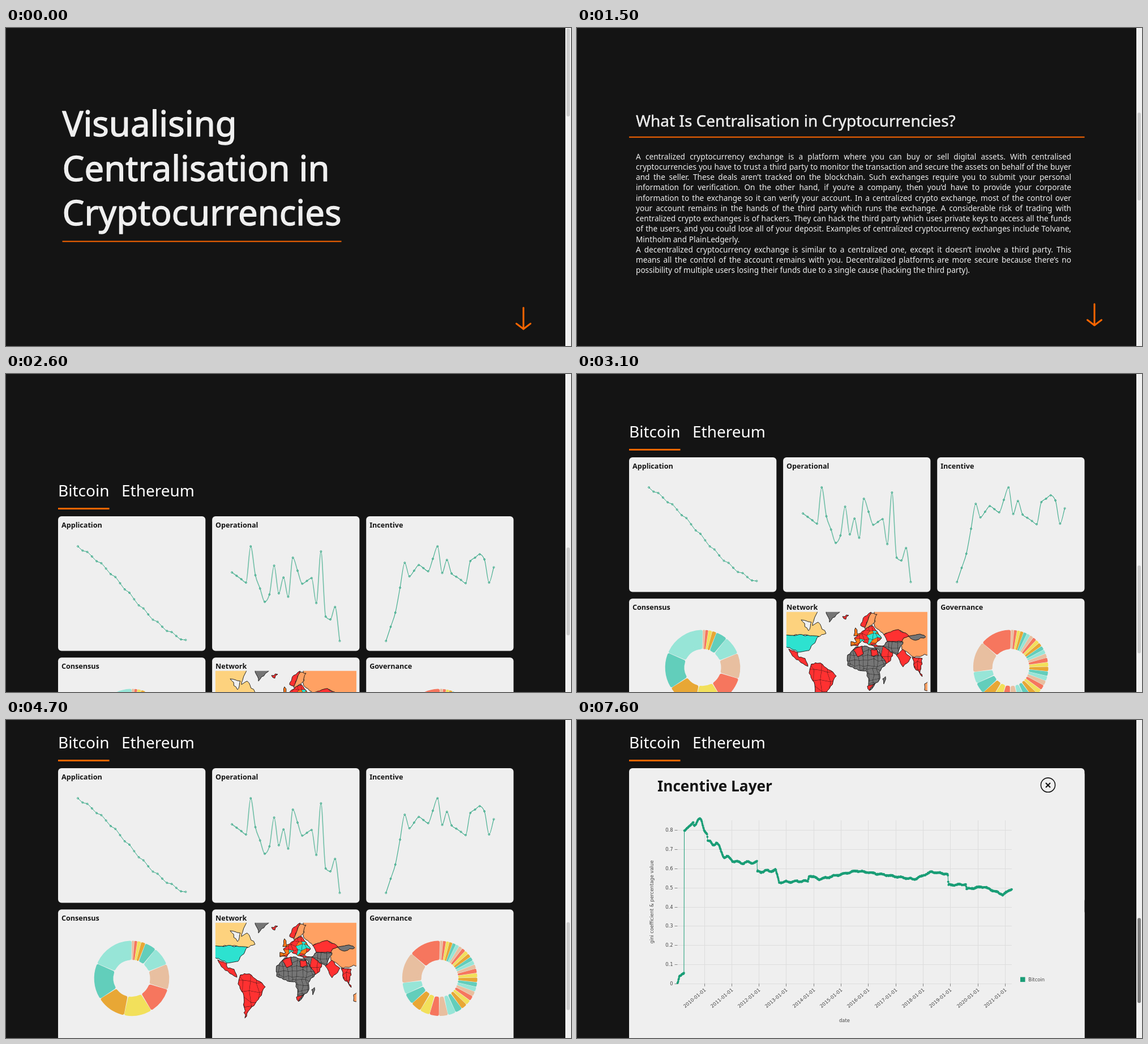
These frames come from a looping animation (998x561 px, 8 s). An HTML page with a canvas:

```html
<!DOCTYPE html>
<html lang="en">
<head>
<meta charset="utf-8">
<title>Visualising Centralisation in Cryptocurrencies</title>
<style>
html, body { margin: 0; width: 100%; height: 100%; overflow: hidden; background: #141414; }
canvas { display: block; }
</style>
</head>
<body>
<canvas id="stage" width="998" height="561"></canvas>
<script>
const W = 998, H = 561, LOOP = 8000, STEP = 100;
const ctx = document.getElementById('stage').getContext('2d');
const SANS = '"Noto Sans", "Open Sans", sans-serif';
const LABEL = '"DejaVu Sans", Verdana, sans-serif';
const BG = '#141414', LIGHT = '#efefef', ORANGE = '#ff6600', GREEN = '#1b9e77';
const TICK = 1000 / 24; // one notch of the mouse wheel

// Wheel notches scrolled by a given time: [ms, notches]
const SCROLL = [[0, 0], [1000, 6], [1900, 16.2], [2000, 19], [2200, 19], [2400, 23], [2500, 23],
  [2600, 24], [2800, 24], [3400, 29], [4100, 29], [4300, 28]];

const PARAGRAPHS = [[
  'A centralized cryptocurrency exchange is a platform where you can buy or sell digital assets. With centralised',
  'cryptocurrencies you have to trust a third party to monitor the transaction and secure the assets on behalf of the buyer',
  'and the seller. These deals aren’t tracked on the blockchain. Such exchanges require you to submit your personal',
  'information for verification. On the other hand, if you’re a company, then you’d have to provide your corporate',
  'information to the exchange so it can verify your account. In a centralized crypto exchange, most of the control over',
  'your account remains in the hands of the third party which runs the exchange. A considerable risk of trading with',
  'centralized crypto exchanges is of hackers. They can hack the third party which uses private keys to access all the funds',
  'of the users, and you could lose all of your deposit. Examples of centralized cryptocurrency exchanges include Tolvane,',
  'Mintholm and PlainLedgerly.'
], [
  'A decentralized cryptocurrency exchange is similar to a centralized one, except it doesn’t involve a third party. This',
  'means all the control of the account remains with you. Decentralized platforms are more secure because there’s no',
  'possibility of multiple users losing their funds due to a single cause (hacking the third party).'
]];

const clamp = v => Math.max(0, Math.min(1, v));

function keyed(keys, t) {
  for (let i = 1; i < keys.length; i++) {
    const [t0, a] = keys[i - 1], [t1, b] = keys[i];
    if (t <= t1) return a + (b - a) * clamp((t - t0) / (t1 - t0));
  }
  return keys[keys.length - 1][1];
}

const series = (n, f) => Array.from({ length: n }, (_, i) => f(i));
const through = keys => i => keyed(keys, i);

function seeded(n) {
  return () => (n = (n * 16807) % 2147483647) / 2147483647;
}

// Card charts: turning points, the rest is interpolated
const POINTS = 24;
const APPLICATION = series(POINTS, i => {
  const u = i / (POINTS - 1);
  return 53 + 167 * u - 8 * Math.sin(2 * Math.PI * u) + 5 * Math.sin(Math.PI * u) + 2 * Math.sin(i * 2.1);
});
const OPERATIONAL = series(POINTS, through([[0, 99], [3, 117], [4, 53], [5, 104], [7, 151], [8, 138], [9, 87],
  [10, 136], [11, 108], [12, 142], [13, 73], [15, 119], [17, 109], [18, 153], [19, 62], [20, 177], [21, 182], [22, 160], [23, 220]]));
const INCENTIVE = series(POINTS, through([[0, 220], [2, 170], [4, 82], [5, 106], [7, 86], [9, 97], [11, 53],
  [12, 100], [13, 77], [14, 101], [17, 118], [18, 79], [20, 67], [21, 76], [22, 117], [23, 90]]));

const PIE = ['#e8bfa0', '#f6765e', '#f2e05b', '#e8a735', '#62cebb', '#97e5d7'];
const CONSENSUS = series(12, through([[0, 4], [3, 7], [6, 40], [9, 46], [11, 68]]));
const GOVERNANCE = series(32, through([[0, 4.8], [20, 8], [24, 14], [29, 18], [30, 48], [31, 49]]));

// Coarse outlines; coasts are roughened, several colours make a patchwork of countries
const RED = '#ff3131', GREY = '#757575', PEACH = '#ffa163', AMBER = '#ff7a1a', SAND = '#fdd27e', CYAN = '#2de2d0';
const LANDS = [
  { fill: [SAND], shape: '-3,-3 56,-3 46,24 56,18 70,38 46,47 38,41 -3,41' },
  { fill: [LIGHT], shape: '26,14 44,18 39,33' },
  { fill: [CYAN], shape: '-3,41 38,41 57,43 40,68 20,71 -3,60' },
  { fill: [RED], shape: '4,65 20,72 22,80 33,82 38,96 14,80' },
  { fill: [RED], cell: 15, shape: '44,92 60,90 88,113 76,135 58,156 52,168 50,128 40,108' },
  { fill: [GREY], shape: '70,-2 96,-2 76,18' },
  { fill: [RED], shape: '99,8 110,6 105,13' },
  { fill: [PEACH], shape: '156,-3 253,-3 253,74 226,80 204,66 198,50 214,42 198,32 172,40 156,26' },
  { fill: [GREY], shape: '212,43 236,39 246,44 228,50' },
  { fill: [RED], shape: '172,40 198,31 216,42 200,53 178,52' },
  { fill: [RED], shape: '131,24 138,8 150,0 138,27' },
  { fill: [PEACH], shape: '138,29 150,2 160,4 156,18 144,28' },
  { fill: [AMBER], shape: '119,42 122,28 128,40' },
  { fill: [AMBER, RED, CYAN, AMBER, RED], cell: 8, shape: '120,46 134,34 152,24 168,46 158,56 146,58 134,50 126,60 114,60 114,52 124,53' },
  { fill: [RED, RED, GREY], cell: 13, shape: '150,58 180,60 188,72 184,86 172,92 164,68' },
  { fill: [GREY], cell: 9, shape: '170,60 180,52 206,53 196,76' },
  { fill: [RED], shape: '194,76 206,66 220,80 206,97' },
  { fill: [RED], cell: 9, shape: '222,80 240,82 236,104 240,114 226,98' },
  { fill: [PEACH], shape: '253,121 244,127 244,138 253,138' },
  { fill: [GREY], cell: 8.5, shape: '108,76 122,62 138,60 160,66 176,90 164,106 164,120 148,138 141,104 120,100 108,94' },
  { fill: [RED], shape: '118,66 134,60 136,74 126,79' },
  { fill: [RED], shape: '150,66 160,66 163,77 150,77' },
  { fill: [RED], shape: '143,131 157,126 147,139' },
  { fill: [GREY], shape: '170,118 175,114 172,127' }
];

// Trend of the large chart in stage positions
const GINI = [[177.5, 465], [181, 452], [189, 446.5], [189.3, 196], [205, 181], [220, 178], [230, 203], [231, 217],
  [246, 217], [260, 240], [285, 252], [318, 251], [318.5, 268], [351, 265], [357, 286], [408, 284], [410, 274],
  [428, 281], [494, 266], [596, 281], [626, 268], [655, 272], [656, 291], [687, 290], [688, 298], [718, 294],
  [752, 308], [768, 298]];

function text(str, x, y, size, color, { font = SANS, weight = 400, align = 'left', thicken = 0 } = {}) {
  ctx.font = `${weight} ${size}px ${font}`;
  ctx.textAlign = align;
  ctx.fillStyle = ctx.strokeStyle = color;
  ctx.fillText(str, x, y);
  if (thicken) {
    ctx.lineWidth = size * thicken;
    ctx.lineJoin = 'round';
    ctx.strokeText(str, x, y);
  }
}

function justified(str, x, y, size, width) {
  const words = str.split(' ');
  ctx.font = `400 ${size}px ${SANS}`;
  const used = words.reduce((sum, w) => sum + ctx.measureText(w).width, 0);
  const gap = (width - used) / (words.length - 1);
  for (const w of words) {
    text(w, x, y, size, LIGHT);
    x += ctx.measureText(w).width + gap;
  }
}

function rect(x, y, w, h, color, r = 0) {
  ctx.fillStyle = color;
  ctx.beginPath();
  ctx.roundRect(x, y, w, h, r);
  ctx.fill();
}

function line(points, color, width) {
  ctx.strokeStyle = color;
  ctx.lineWidth = width;
  ctx.beginPath();
  for (const [x, y] of points) ctx.lineTo(x, y);
  ctx.stroke();
}

function at(x, y, draw) {
  ctx.save();
  ctx.translate(x, y);
  draw();
  ctx.restore();
}

// Monotone cubic line through evenly spaced values, with ring markers
function spark(values, width, alpha) {
  const last = values.length - 1, dx = 190.4 / last, x0 = 35;
  const d = i => (values[i + 1] - values[i]) / dx;
  const slope = i => {
    if (i === 0) return d(0);
    if (i === last) return d(last - 1);
    const a = d(i - 1), b = d(i);
    return a * b <= 0 ? 0 : Math.sign(a) * Math.min(Math.abs(a), Math.abs(b), Math.abs(a + b) / 4) * 2;
  };
  ctx.strokeStyle = GREEN;
  ctx.lineWidth = width;
  ctx.globalAlpha = alpha;
  ctx.beginPath();
  ctx.moveTo(x0, values[0]);
  for (let i = 0; i < last; i++) {
    const x = x0 + i * dx, k = dx / 3;
    ctx.bezierCurveTo(x + k, values[i] + k * slope(i), x + 2 * k, values[i + 1] - k * slope(i + 1), x + dx, values[i + 1]);
  }
  ctx.stroke();
  ctx.globalAlpha = 0.8;
  ctx.lineWidth = 1;
  values.forEach((v, i) => {
    ctx.beginPath();
    ctx.arc(x0 + i * dx, v, 1.5, 0, 7);
    ctx.stroke();
  });
  ctx.globalAlpha = 1;
}

function donut(sizes) {
  const outer = 66.3, inner = 32.5;
  const unit = 2 * Math.PI / sizes.reduce((a, b) => a + b);
  let a = -Math.PI / 2;
  ctx.lineJoin = 'round';
  sizes.forEach((size, i) => {
    const b = a + size * unit;
    const c = Math.min(3, inner * (b - a) * 0.45);
    const po = (c + 0.3) / outer, pi = Math.min((c + 0.3) / inner, (b - a) * 0.49);
    ctx.beginPath();
    ctx.arc(0, 0, outer - c, a + po, b - po);
    ctx.arc(0, 0, inner + c, b - pi, a + pi, true);
    ctx.closePath();
    ctx.fillStyle = ctx.strokeStyle = PIE[i % PIE.length];
    ctx.lineWidth = 2 * c;
    ctx.fill();
    ctx.stroke();
    a = b;
  });
}

function coast(shape, rnd) {
  const corners = shape.split(' ').map(p => p.split(',').map(Number));
  const path = new Path2D();
  corners.forEach(([x, y], i) => {
    const [x1, y1] = corners[(i + 1) % corners.length];
    const n = Math.ceil(Math.hypot(x1 - x, y1 - y) / 5);
    path.lineTo(x, y);
    for (let k = 1; k < n; k++) {
      path.lineTo(x + (x1 - x) * k / n + (rnd() - 0.5) * 3, y + (y1 - y) * k / n + (rnd() - 0.5) * 3);
    }
  });
  path.closePath();
  return path;
}

function countries(path, cell, fill, rnd) {
  const mesh = series(Math.ceil(180 / cell), j => series(Math.ceil(260 / cell), i =>
    [(i + (rnd() - 0.5) * 0.8) * cell, (j + (rnd() - 0.5) * 0.8) * cell]));
  ctx.save();
  ctx.clip(path);
  for (let j = 1; j < mesh.length; j++) {
    for (let i = 1; i < mesh[j].length; i++) {
      ctx.fillStyle = fill[Math.floor(rnd() * fill.length)];
      line([mesh[j - 1][i - 1], mesh[j - 1][i], mesh[j][i], mesh[j][i - 1], mesh[j - 1][i - 1]], '#111', 0.8);
      ctx.fill();
    }
  }
  ctx.restore();
}

function worldMap() {
  const rnd = seeded(77);
  ctx.beginPath();
  ctx.rect(0, 0, 249, 180);
  ctx.clip();
  ctx.lineJoin = 'round';
  for (const { fill, cell, shape } of LANDS) {
    const path = coast(shape, rnd);
    ctx.fillStyle = fill[0];
    ctx.fill(path);
    if (cell) countries(path, cell, fill, rnd);
    ctx.strokeStyle = '#111';
    ctx.lineWidth = 0.9;
    ctx.stroke(path);
  }
}

const CARDS = [
  ['Application', () => spark(APPLICATION, 1, 0.9)],
  ['Operational', () => spark(OPERATIONAL, 1.6, 0.6)],
  ['Incentive', () => spark(INCENTIVE, 1.1, 0.85)],
  ['Consensus', () => at(130, 121.5, () => donut(CONSENSUS))],
  ['Network', () => at(5.8, 23.5, worldMap)],
  ['Governance', () => at(130, 121.5, () => donut(GOVERNANCE))]
];

function page() {
  ['Visualising', 'Centralisation in', 'Cryptocurrencies'].forEach((s, i) =>
    text(s, 99.5, 191 + 78.5 * i, 61.6, LIGHT, { thicken: 0.022 }));
  rect(99.5, 375.5, 493, 2, ORANGE);

  text('What Is Centralisation in Cryptocurrencies?', 104, 659.5, 28, LIGHT, { thicken: 0.016 });
  rect(92, 677.5, 804.5, 2, ORANGE);
  let y = 717.5;
  for (const lines of PARAGRAPHS) {
    lines.forEach((s, i) => {
      if (i === lines.length - 1) text(s, 104, y, 13.64, LIGHT);
      else justified(s, 104, y, 13.64, 769);
      y += 18.26;
    });
  }

  text('Bitcoin', 92, 1216, 28, '#fff');
  text('Ethereum', 204, 1216, 28, '#fff');
  rect(92, 1236, 90.5, 3, ORANGE);

  CARDS.forEach(([name, draw], i) => {
    at(92 + 272.1 * (i % 3), i < 3 ? 1251 : 1500.3, () => {
      rect(0, 0, 260.3, 237.5, LIGHT, 6);
      text(name, 6, 19.5, 12.6, BG, { weight: 700 });
      draw();
    });
  });
}

function axes() {
  const label = (s, x, y, align) => text(s, x, y, 8.4, '#444', { font: LABEL, align });
  for (let i = 0; i <= 8; i++) {
    const y = Math.round(465 - 33.87 * i) + 0.5;
    line([[177.5, y], [768, y]], '#dddddd', 1);
    line([[172.5, y], [177.5, y]], '#888', 1);
    label(i ? '0.' + i : '0', 169.5, y + 2.5, 'right');
  }
  for (let i = 0; i < 12; i++) {
    const x = Math.round(224.5 + 48.32 * i) + 0.5;
    line([[x, 177], [x, 465]], '#dddddd', 1);
    line([[x, 465], [x, 470]], '#888', 1);
    at(x + 1.5, 475.5, () => {
      ctx.rotate(-40 * Math.PI / 180);
      label(2010 + i + '-01-01', 0, 2, 'right');
    });
  }
  at(135, 321, () => {
    ctx.rotate(-Math.PI / 2);
    label('gini coefficient & percentage value', 0, 0, 'center');
  });
  label('date', 472.5, 533, 'center');
  rect(783, 453.5, 8.6, 8.6, GREEN);
  label('Bitcoin', 797.3, 460.5, 'left');
}

function bigChart() {
  axes();
  // Daily values swing widely at first, then settle
  const rnd = seeded(5), days = [];
  for (let x = 177.5; x <= 768; x += 0.6) {
    const swing = x < 206 ? 0 : 0.8 + 5 * Math.exp((206 - x) / 70);
    days.push([x, keyed(GINI, x) + swing * Math.sin(x / 2.7) + (rnd() - 0.5) * 1.8]);
  }
  line(days, GREEN, 1);
  ctx.fillStyle = GREEN;
  for (const [x, y] of days) {
    ctx.beginPath();
    ctx.arc(x, y, 1.9, 0, 7);
    ctx.fill();
  }
}

function modal(chartAlpha) {
  rect(92, 85, 804.5, 520, LIGHT, 12);
  text('Incentive Layer', 142, 126, 26.2, BG, { weight: 700 });
  ctx.strokeStyle = BG;
  ctx.lineWidth = 1.6;
  ctx.beginPath();
  ctx.arc(832, 114.7, 12.6, 0, 7);
  ctx.stroke();
  line([[828, 111], [836, 119]], BG, 2.2);
  line([[836, 111], [828, 119]], BG, 2.2);
  if (chartAlpha > 0) {
    ctx.globalAlpha *= chartAlpha;
    bigChart();
  }
}

function arrow(t) {
  const lift = 13 * Math.sin(Math.PI * t / 2000) ** 2;
  at(914, 493.5 - lift, () => {
    ctx.lineCap = ctx.lineJoin = 'round';
    line([[0, 0], [0, 37.5]], ORANGE, 3);
    line([[-12.5, 28], [0, 37.5], [12.5, 28]], ORANGE, 3);
  });
}

function scrollbar(scroll, grown, dark) {
  const grey = Math.round(205 - 77 * dark);
  rect(988, 0, 10, H, '#f0f0f0');
  rect(990, 1 + scroll * 0.305 - 7.5 * grown, 6, 155 - 5 * grown, `rgb(${grey},${grey},${grey})`, 3);
}

function render(t) {
  const scroll = Math.floor(keyed(SCROLL, t) * TICK + 0.01);
  const open = clamp((t - 4800) / 400);
  rect(0, 0, W, H, BG);
  at(0, -scroll, page);
  if (scroll < 500) arrow(t);
  if (open > 0) {
    ctx.save();
    ctx.globalAlpha = open;
    modal(clamp((t - 6600) / 600));
    ctx.restore();
  }
  scrollbar(scroll, open, clamp((t - 7300) / 300));
}

function tick() {
  render(Math.floor(performance.now() % LOOP / STEP) * STEP);
  requestAnimationFrame(tick);
}
tick();
</script>
</body>
</html>
```
